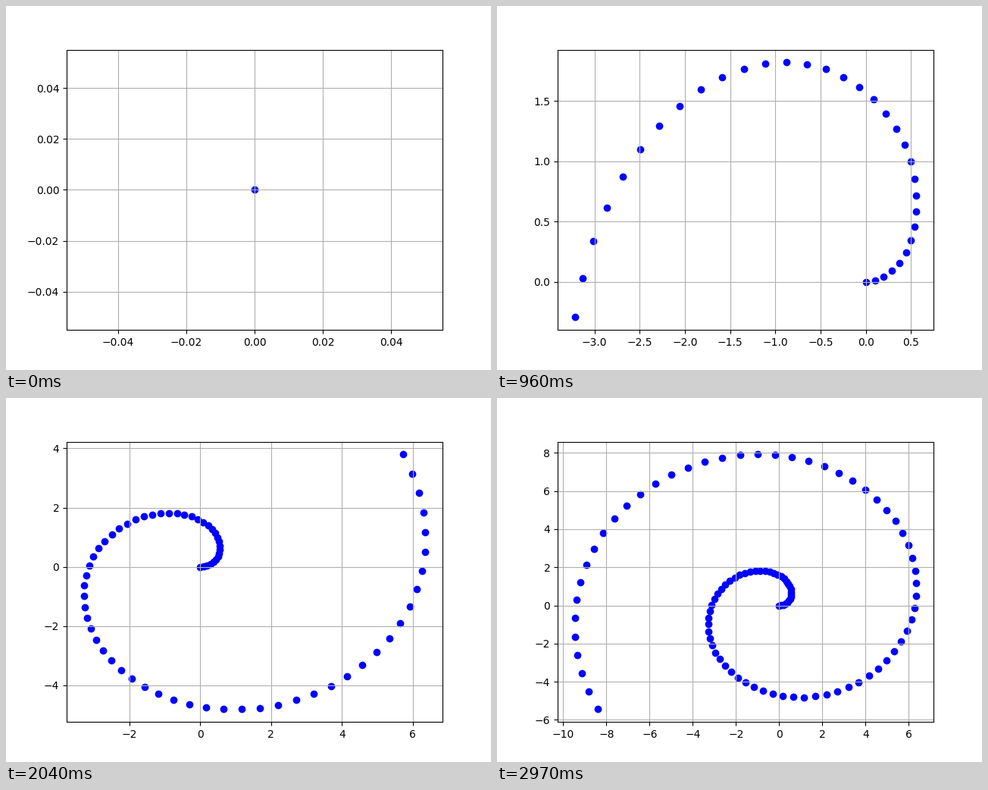
Write a matplotlib script that moves like this. It is 640x480 px and loops after 3000 ms.

```python
import numpy as np
import matplotlib.pyplot as plt
from matplotlib.animation import FuncAnimation

STEPS = 100
INTERVAL = 30  # ms

# Archimedean spiral, radius equal to angle
t = np.linspace(0, 10, STEPS)
x, y = t * np.cos(t), t * np.sin(t)

fig, ax = plt.subplots(figsize=(6.4, 4.8), dpi=100)


def draw(i):
    """Show the first i + 1 points; the axes rescale to fit them."""
    ax.clear()
    ax.grid(True)
    ax.scatter(x[:i + 1], y[:i + 1], color="b")


anim = FuncAnimation(fig, draw, frames=STEPS, interval=INTERVAL,
                     repeat=True, repeat_delay=0)
plt.show()
```
